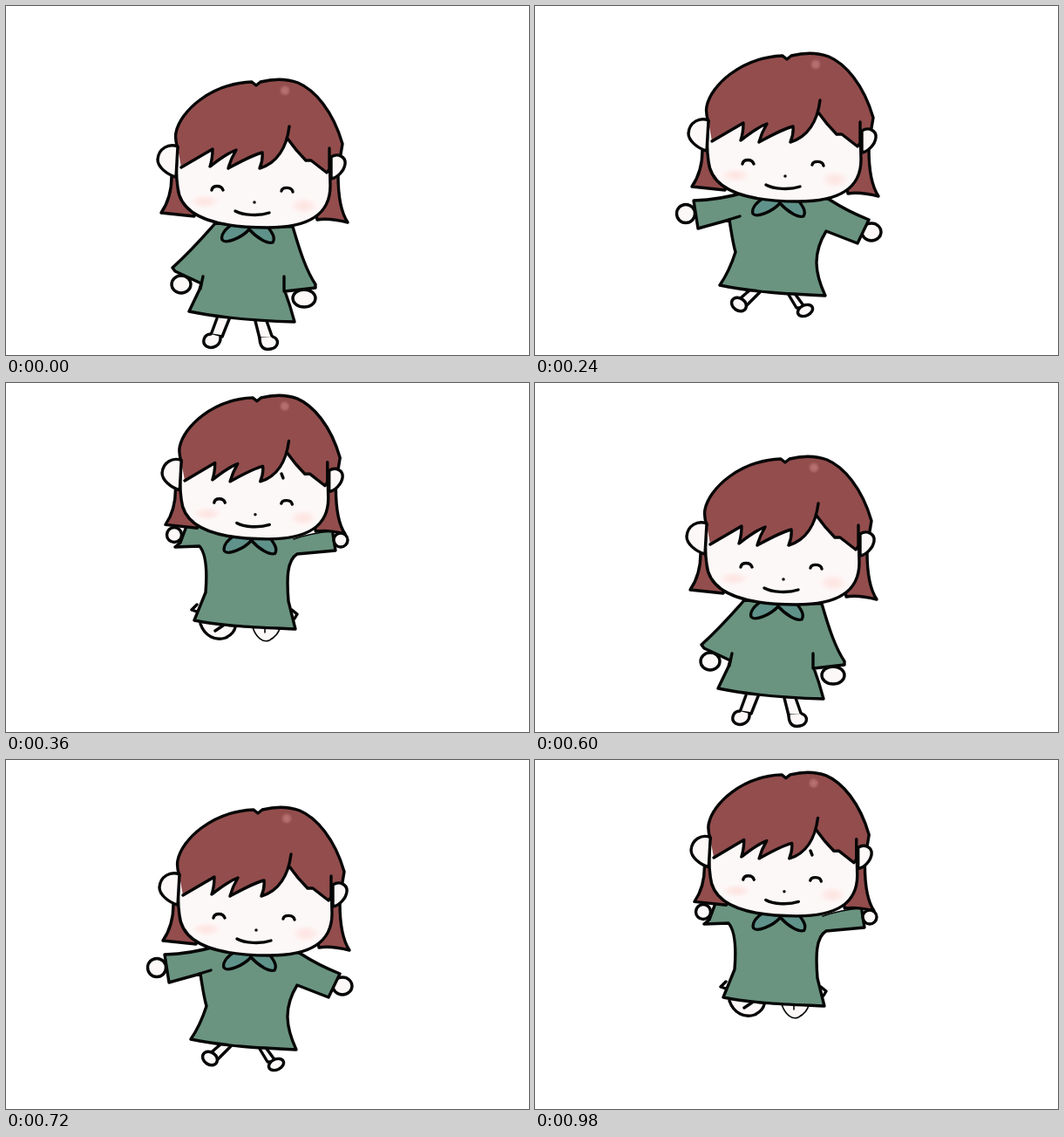
Animation of 600x400 px, one loop 1080 ms. Source, as an HTML page without scripts:

```html
<!DOCTYPE html>
<html lang="en">
<head>
<meta charset="utf-8">
<title>Jumping girl</title>
<style>
html, body { margin: 0; width: 100%; height: 100%; overflow: hidden; background: #fff; }
svg { display: block; width: 100vw; height: 100vh; }
path, ellipse { stroke: #060606; stroke-width: 3.4; stroke-linecap: round; stroke-linejoin: round; fill: none; vector-effect: non-scaling-stroke; }
.hair { fill: #934d4d; }
.skin { fill: #fdf8f8; }
.dress { fill: #6a9480; }
.collar { fill: #5f928a; }
.fill { stroke: none; }
.dot { stroke: none; fill: #111; }
.blush { stroke: none; fill: url(#blush); }
.shine { stroke: none; fill: url(#shine); }
.thin { stroke-width: 1.6; }

/* three held poses, played twice per loop */
.pose { visibility: hidden; animation: 1080ms step-end infinite; }
.stand { animation-name: stand; }
.hop { animation-name: hop; }
.jump { animation-name: jump; }
@keyframes stand {
  0%, 55.5556% { visibility: visible; }
  22.2222%, 66.6667%, 100% { visibility: hidden; }
}
@keyframes hop {
  0%, 33.3333%, 77.7778%, 100% { visibility: hidden; }
  22.2222%, 66.6667% { visibility: visible; }
}
@keyframes jump {
  0%, 55.5556% { visibility: hidden; }
  33.3333%, 77.7778%, 100% { visibility: visible; }
}
</style>
</head>
<body>
<svg viewBox="0 0 600 400">
  <defs>
    <radialGradient id="blush">
      <stop offset="0" stop-color="#fde3e0"/>
      <stop offset=".5" stop-color="#fde9e6" stop-opacity=".8"/>
      <stop offset="1" stop-color="#fdf2f0" stop-opacity="0"/>
    </radialGradient>
    <radialGradient id="shine">
      <stop offset="0" stop-color="#b97473"/>
      <stop offset=".55" stop-color="#ae6766"/>
      <stop offset="1" stop-color="#934d4d" stop-opacity="0"/>
    </radialGradient>

    <g id="collar">
      <path class="collar" d="M279 256C270 266 252 273 248 268C246 262 252 255 260 250H279Z"/>
      <path class="collar" d="M279 256C288 266 300 273 306 271C310 265 304 258 298 250H279Z"/>
    </g>

    <g id="head">
      <path class="hair" d="M190 195C190 212 185 227 178 237L216 241L230 200Z"/>
      <path class="hair" d="M381 194C381 218 384 236 392 248C380 245 368 243 357 245L350 200Z"/>
      <path class="skin" d="M197 162C195 180 195 195 197 208C200 240 238 254 300 254C346 254 372 240 372 206L371 163L290 110Z"/>
      <ellipse class="blush" cx="228" cy="224" rx="19" ry="9"/>
      <ellipse class="blush" cx="342" cy="229" rx="18" ry="11"/>
      <path class="hair fill" d="M197 163C195 157 194 150 195 145C200 121 234 89 282 87L287 91L292 87C308 83 324 84 335 88C354 96 375 120 386 158L384 172L371 188L368 191L350 177H344C337 170 330 162 323 152C317 168 308 180 291 186Q295 176 294 168C282 171 268 179 255 186Q258 175 264 165C253 169 243 177 234 184Q237 175 237 164Q220 174 201 185Z"/>
      <path d="M197 163C195 157 194 150 195 145C200 121 234 89 282 87L287 91L292 87C308 83 324 84 335 88C354 96 375 120 386 158L384 170"/>
      <path d="M201 185Q220 174 237 164Q237 175 234 184C243 177 253 169 264 165Q258 175 255 186C268 179 282 171 294 168Q295 176 291 186C311 180 322 162 325 138"/>
      <path d="M323 152C330 162 337 170 344 177H350L368 191L371 187V163"/>
      <path class="skin" d="M197 161C187 157 175 163 174 176C174 184 184 193 195 196Z"/>
      <path class="skin" d="M373 173C381 168 390 173 389 181C388 189 380 197 373 198Z"/>
      <ellipse class="shine" cx="320" cy="97" rx="7.5" ry="7.5"/>
      <path d="M236 211C237 205 247 205 249 211M316 212C317 207 328 207 329 213"/>
      <path d="M263 235C272 240 290 241 302 237"/>
      <ellipse class="dot" cx="285" cy="225" rx="1.8" ry="1.8"/>
    </g>
  </defs>

  <g class="pose stand">
    <path class="skin" d="M242 358L235 377L248 379L256 359M286 361L291 381L306 381L299 361"/>
    <path class="skin" d="M235 376C227 376 224 386 230 390C237 394 247 389 246 379"/>
    <path class="skin" d="M291 380C291 390 295 395 304 393C313 391 314 382 306 379"/>
    <ellipse class="skin" cx="201" cy="319" rx="11" ry="10"/>
    <ellipse class="skin" cx="342" cy="335" rx="13" ry="10"/>
    <path class="dress" d="M240 249Q214 279 191 300L194 304L224 318L222 325L210 350C250 358 290 361 331 362Q326 343 320 327L355 323V319C345 304 338 284 329 253Z"/>
    <path d="M226 310L223 324M319 310V327"/>
    <use href="#collar"/>
    <use href="#head"/>
  </g>

  <g class="pose hop">
    <path class="skin" d="M246 326L231 339L241 345L258 328M291 331L300 346L310 346L299 331"/>
    <ellipse class="skin" cx="234" cy="342" rx="9" ry="7" transform="rotate(35 234 342)"/>
    <ellipse class="skin" cx="310" cy="349" rx="9" ry="6" transform="rotate(-25 310 349)"/>
    <ellipse class="skin" cx="173" cy="238" rx="10.5" ry="10.5"/>
    <ellipse class="skin" cx="386" cy="259" rx="11" ry="10"/>
    <path class="dress" d="M243 213Q213 222 182 223L187 255L223 245C225 258 227 272 230 282Q223 304 212 320C250 328 290 330 333 332C321 306 318 284 334 258L370 272L383 245Q358 235 338 222L285 205Z"/>
    <path d="M222 245L235 241"/>
    <use href="#collar" x="2" y="-30"/>
    <use href="#head" x="2" y="-30"/>
  </g>

  <g class="pose jump">
    <path class="skin" d="M223 276C228 290 240 296 252 292C258 289 262 285 263 280M240 284L249 278"/>
    <path class="skin thin" d="M283 280C287 292 295 298 302 295C309 291 313 286 314 281M297 280V286"/>
    <path d="M219 254L213 260L219 262M328 260L334 265L331 270"/>
    <path class="dress fill" d="M206 164L194 188L222 187C229 195 231 215 229 240L216 272C250 279 290 280 332 282L324 250C322 225 322 203 334 196L378 192L376 171L365 170L330 178L285 165Z"/>
    <path d="M206 167L200 183L194 188L222 187C229 195 231 215 229 240L216 272C250 279 290 280 332 282L324 250C322 225 322 203 334 196L378 192L375 173"/>
    <use href="#collar" x="2.5" y="-75.5"/>
    <use href="#head" transform="translate(11.5 -67.5) scale(.963 .97)"/>
    <path class="thin" d="M330 179Q350 172 373 170"/>
    <path d="M316 104L318 109"/>
    <ellipse class="skin" cx="193" cy="174" rx="8.5" ry="8.5"/>
    <ellipse class="skin" cx="384" cy="180" rx="8" ry="8"/>
  </g>
</svg>
</body>
</html>
```
